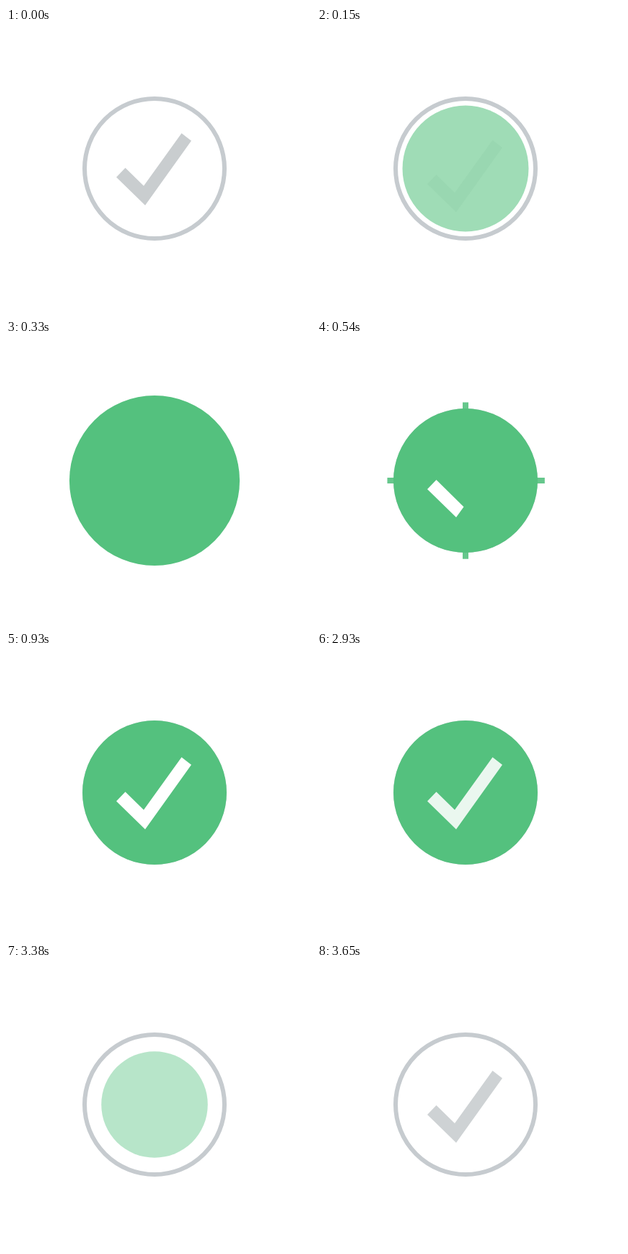
An HTML page with a canvas that plays this animation: 423x394 px, repeating every 3.68 s.

```html
<!DOCTYPE html>
<html lang="en">
<head>
<meta charset="utf-8">
<title>Check button</title>
<style>
html, body { margin: 0; width: 100%; height: 100%; overflow: hidden; background: #fff; }
canvas { display: block; }
</style>
</head>
<body>
<canvas id="stage" width="423" height="394"></canvas>
<script>
const ctx = document.getElementById('stage').getContext('2d');
const LOOP = 3680, STEP = 30, HOLD = 930, RESUME = 2930;
const CX = 206, CY = 195, R = 100, PEAK = 120.5;
const GREEN = '#54c17e', GREY = '#c9cdcf', RING = '#c6cbcf';
const CHECK = [[153, 207], [165.5, 194], [191, 219], [243.5, 146], [257, 156.5], [193, 246]];
// Directions of the burst and how far each ray flies
const RAYS = [[1, 0, 108], [0, 1, 98], [-1, 0, 96], [0, -1, 96]];

const progress = (t, from, to) => Math.min(1, Math.max(0, (t - from) / (to - from)));
const mix = (a, b, p) => a + (b - a) * p;
const mixPoint = (a, b, p) => [mix(a[0], b[0], p), mix(a[1], b[1], p)];
const easeOut = p => Math.sin(p * Math.PI / 2);
const easeInOut = p => (1 - Math.cos(p * Math.PI)) / 2;

function polygon(points, color, alpha = 1, dy = 0) {
  ctx.globalAlpha = alpha;
  ctx.fillStyle = color;
  ctx.beginPath();
  points.forEach(([x, y]) => ctx.lineTo(x, y + dy));
  ctx.fill();
}

function drawRing() {
  ctx.globalAlpha = 1;
  ctx.strokeStyle = RING;
  ctx.lineWidth = 6;
  ctx.beginPath();
  ctx.arc(CX, CY, R - 3, 0, 2 * Math.PI);
  ctx.stroke();
}

function drawGreyCheck(t) {
  if (t < 1500) {
    const p = progress(t, 0, 200);
    polygon(CHECK, GREY, 1 - p, 12.5 * p);
  } else {
    polygon(CHECK, GREY, progress(t, 3440, 3675), 12.5 * (1 - progress(t, 3440, 3690)));
  }
}

function drawRays(t) {
  const p = progress(t, 492, HOLD);
  if (p === 0 || p === 1) return;
  ctx.globalAlpha = 1 - p;
  ctx.strokeStyle = GREEN;
  ctx.lineWidth = 8;
  for (const [dx, dy, reach] of RAYS) {
    const tip = 98 + reach * p, tail = tip - 30;
    ctx.beginPath();
    ctx.moveTo(CX + dx * tail, CY + dy * tail);
    ctx.lineTo(CX + dx * tip, CY + dy * tip);
    ctx.stroke();
  }
}

function disc(t) {
  if (t < 290) return [PEAK * easeOut(t / 290), progress(t, 0, 268)];
  if (t < 3170) return [mix(PEAK, R, easeInOut(progress(t, 290, 470))), 1];
  if (t < 3297) return [mix(R, PEAK, progress(t, 3170, 3297)), 1];
  const p = progress(t, 3297, 3440);
  return [PEAK * Math.cos(p * Math.PI / 2), 1 - p];
}

function drawDisc(t) {
  const [radius, alpha] = disc(t);
  ctx.globalAlpha = alpha;
  ctx.fillStyle = GREEN;
  ctx.beginPath();
  ctx.arc(CX, CY, Math.max(0, radius), 0, 2 * Math.PI);
  ctx.fill();
}

function drawWhiteCheck(t) {
  const short = progress(t, 420, 540), long = progress(t, 540, 720);
  const alpha = 1 - progress(t, 2900, 3150);
  if (!short || !alpha) return;
  const [a, b, inner, tipIn, tipOut, corner] = CHECK;
  const outer = [203.5, 231.5];
  if (long === 0) {
    polygon([a, b, mixPoint(b, outer, short), mixPoint(a, corner, short)], '#fff', alpha);
  } else {
    polygon([a, b, inner, mixPoint(inner, tipIn, long), mixPoint(outer, tipOut, long), corner], '#fff', alpha);
  }
}

// The picture advances in fixed steps, with a long rest on the finished check
function stepped(t) {
  if (t < HOLD) return t - t % STEP;
  return t < RESUME ? HOLD : t - (t - RESUME) % STEP;
}

const start = performance.now();
function frame() {
  const t = stepped((performance.now() - start) % LOOP);
  ctx.clearRect(0, 0, 423, 394);
  drawRing();
  drawGreyCheck(t);
  drawRays(t);
  drawDisc(t);
  drawWhiteCheck(t);
  requestAnimationFrame(frame);
}
frame();
</script>
</body>
</html>
```
